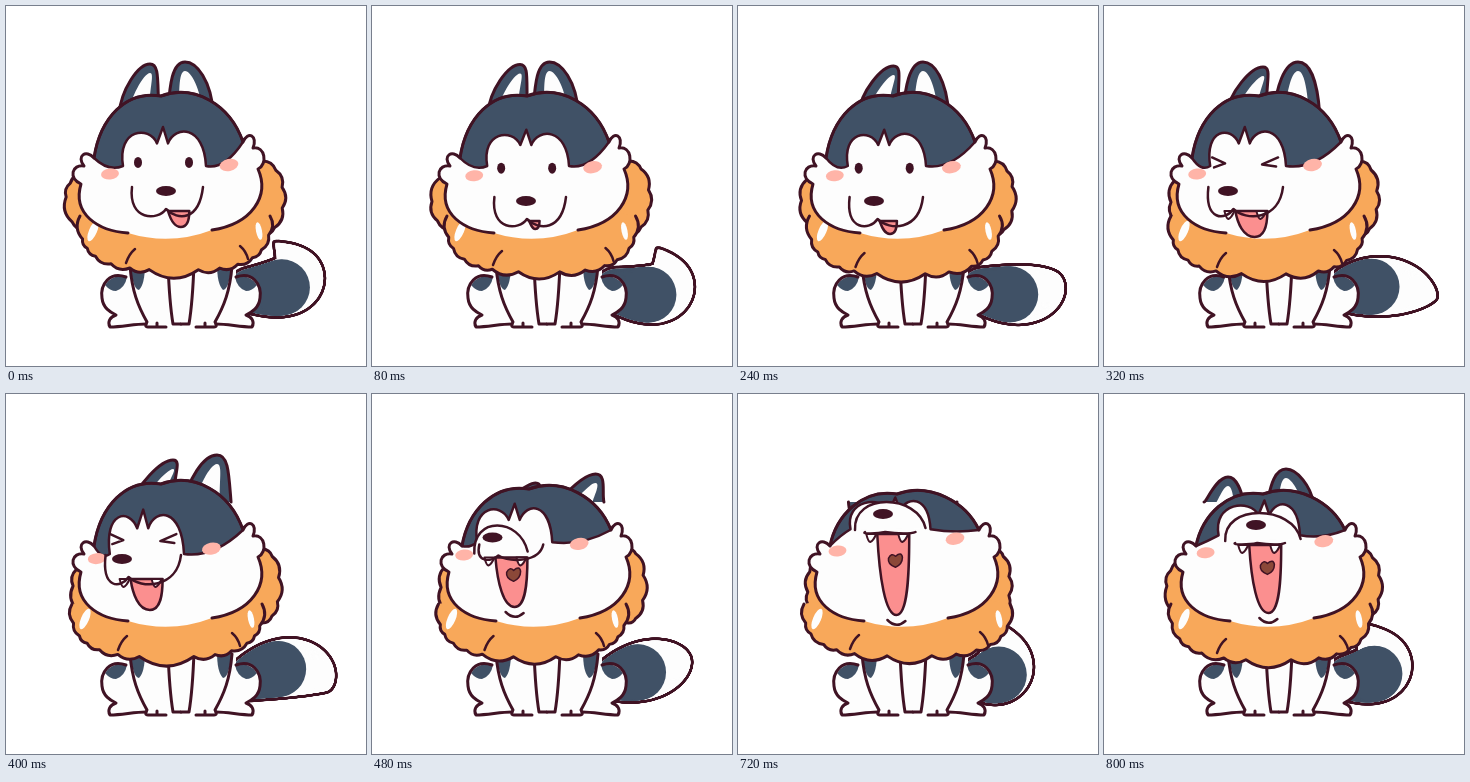
These frames come from a looping animation (360x360 px, 0.88 s). An HTML page with a canvas:

```html
<!DOCTYPE html>
<html lang="en">
<head>
<meta charset="utf-8">
<title>Howling dog</title>
<style>
html, body { margin: 0; width: 100%; height: 100%; overflow: hidden; background: #fff; }
canvas { display: block; width: 360px; height: 360px; }
</style>
</head>
<body>
<canvas id="stage" width="360" height="360"></canvas>
<script>
const ctx = document.getElementById('stage').getContext('2d');
const INK = '#401324', SLATE = '#405166', ORANGE = '#f8a85a', WHITE = '#fdfdfd';
const BLUSH = '#ffb4a8', PINK = '#fb8f8f', BROWN = '#8b4838';
const STEP = 80, STEPS = 11;

// Key poses. back: head thrown back; gape: mouth opening; ears: left and right tip;
// ruff: left, right, bottom; frill: how far the side fur sticks out; tail: bend and tip.
const poses = [
  { at: 0, nose: [160, 185], back: 0, gape: 16, ears: [144, 58, 179, 56], ruff: [74, 264, 264], frill: 1, tail: [325, 285, 268, 236] },
  { at: 2, nose: [148, 205], back: 0, gape: 0, ears: [152, 59, 176, 56], ruff: [76, 263, 268], frill: 1, tail: [322, 322, 302, 248] },
  { at: 4, nose: [124, 185], back: 0, gape: 26, ears: [159, 61, 194, 56], ruff: [67, 260, 268], frill: 0.5, tail: [292, 274, 332, 292] },
  { at: 5, nose: [116, 165], back: 0, gape: 31, ears: [167, 66, 211, 61], ruff: [66, 256, 263], frill: 0.5, tail: [306, 258, 322, 296] },
  { at: 7, nose: [125, 122], back: 1, gape: 68, ears: [160, 112, 236, 99], ruff: [67, 252, 263], frill: 0.2, tail: [276, 286, 306, 234] },
  { at: 9, nose: [145, 120], back: 1, gape: 81, ears: [140, 112, 200, 112], ruff: [66, 272, 262], frill: 0.3, tail: [288, 285, 248, 224] },
  { at: 10, nose: [152, 131], back: 1, gape: 68, ears: [124, 83, 182, 75], ruff: [67, 266, 266], frill: 0.8, tail: [314, 282, 246, 228] }
];

const mix = (a, b, t) => Array.isArray(a) ? a.map((v, i) => mix(v, b[i], t)) : a + (b - a) * t;

function poseAt(step) {
  const i = Math.max(1, poses.findIndex(p => p.at >= step));
  const a = poses[i - 1], b = poses[i], t = (step - a.at) / (b.at - a.at);
  return Object.fromEntries(Object.keys(a).map(key => [key, mix(a[key], b[key], t)]));
}

const random = seed => {
  const v = Math.sin(seed * 12.9898) * 43758.5453;
  return v - Math.floor(v);
};

function paint(path, fill, line = 3) {
  if (fill) { ctx.fillStyle = fill; ctx.fill(path); }
  if (line) { ctx.strokeStyle = INK; ctx.lineWidth = line; ctx.stroke(path); }
}
const shape = (d, fill, line) => paint(new Path2D(d), fill, line);

function oval(x, y, rx, ry, color, tilt = 0) {
  ctx.fillStyle = color;
  ctx.beginPath();
  ctx.ellipse(x, y, rx, ry, tilt, 0, Math.PI * 2);
  ctx.fill();
}

// The tail is a row of discs along a bent spine, swelling and then narrowing to the tip.
function drawTail({ tail: [bx, by, tx, ty] }) {
  const discs = (end, grow, color) => {
    for (let t = 0; t <= end; t += 0.01) {
      const u = 1 - t, r = 30 * Math.sin(Math.PI * (0.25 + 0.75 * t)) ** 0.8 + grow;
      if (r > 0) oval(u * u * 244 + 2 * u * t * bx + t * t * tx, u * u * 284 + 2 * u * t * by + t * t * ty, r, r, color);
    }
  };
  discs(1, 1.5, INK);
  discs(1, -1.5, WHITE);
  discs(0.26, -1.5, SLATE);
}

function drawLegs() {
  const thigh = 'M120 271C104 265 94 278 96 292C97 302 104 306 110 309C104 311 101 316 104 321C116 321 128 318 140 318';
  for (const mirrored of [false, true]) {
    ctx.save();
    if (mirrored) { ctx.translate(350, 0); ctx.scale(-1, 1); }
    shape(thigh + 'L175 318V250H120Z', WHITE, 0);
    shape('M99 279Q106 268 121 271Q119 282 110 285Q104 285 99 279Z', SLATE, 0);
    shape('M124 258Q127 284 133 284Q139 278 139 258Z', SLATE, 0);
    shape(thigh);
    shape('M124 260C126 285 132 300 141 316Q138 321 142 321H160M151 317V320M162 258C163 285 164 300 167 318H175');
    ctx.restore();
  }
}

// Fur edge: jittered notches along an arc, joined by outward bumps.
function drawFur({ cx, cy, rx, ry, from, to, bumps, power = 1, seed }) {
  const bend = v => Math.sign(v) * Math.abs(v) ** power;
  const notches = Array.from({ length: bumps + 1 }, (_, i) => {
    const jitter = i % bumps ? (random(seed + i) - 0.5) * 0.4 : 0;
    const a = mix(from, to, (i + jitter) / bumps);
    return [cx + rx * bend(Math.cos(a)), cy + ry * bend(Math.sin(a))];
  });
  const edge = new Path2D();
  edge.moveTo(...notches[0]);
  for (let i = 1; i <= bumps; i++) {
    const [px, py] = notches[i - 1], [x, y] = notches[i];
    edge.quadraticCurveTo(mix(px, x, 0.5) - (y - py) * 0.35, mix(py, y, 0.5) + (x - px) * 0.35, x, y);
  }
  const body = new Path2D(edge);
  body.lineTo(168, 190);
  paint(body, ORANGE, 0);
  paint(edge);
}

function drawRuff({ ruff: [left, right, bottom], frill }, step) {
  const PI = Math.PI;
  drawFur({ cx: 80, cy: 195, rx: 6 + 14 * frill, ry: 29, from: 1.5 * PI, to: 0.5 * PI, bumps: 4, seed: step });
  drawFur({ cx: 256, cy: 192, rx: 13 + 8 * frill, ry: 37, from: 0.5 * PI, to: -0.5 * PI, bumps: 5, seed: step + 20 });
  drawFur({ cx: (left + right) / 2, cy: 210, rx: (right - left) / 2, ry: bottom - 210,
    from: PI, to: 0, bumps: 13, power: 2 / 3, seed: step + 40 });
  oval(left + 13, 225, 4, 11, WHITE, 0.4);
  oval(right - 11, 225, 3, 9, WHITE, -0.2);
  shape(`M${left + 46} ${bottom - 7}q3 -9 9 -14M${right - 22} ${bottom - 11}q-2 -8 -8 -13`, null, 2.5);
}

function drawEar(cx, tx, ty, width) {
  const ear = (w, y) => `M${cx - w / 2} 108C${cx - w * 0.45} ${y + 26} ${tx - w * 0.3} ${y} ${tx} ${y}
    C${tx + w * 0.25} ${y} ${cx + w * 0.45} ${y + 18} ${cx + w / 2} 108`;
  shape(ear(width, ty), SLATE);
  shape(ear(width * 0.52, ty + 9), WHITE, 0);
}

function drawHead({ nose: [nx, ny], back }) {
  const turn = 160 - nx, drop = 10 * back;
  ctx.save();
  ctx.translate(4 * back, 0);
  const dome = `C224 ${98 + drop} 188 ${78 + drop} 155 ${90 + drop}C120 ${84 + drop} 94 ${112 + drop} 88 152`;
  const outline = `M206 224C246 218 264 190 252 163C262 158 259 140 247 142C252 130 242 124 237 136${dome}
    C80 143 70 150 78 160C66 158 62 172 75 178C66 208 92 225 122 227`;
  shape(outline + 'Q164 240 206 224Z', WHITE, 0);

  // Two brow arches meet in a white spike.
  const x = 157 - 0.45 * turn + 3 * back, y = 121 + (ny - 185) * 0.27;
  const left = 117 - 0.3 * turn - 4 * back, right = 200 - 0.5 * turn - 4 * back;
  const low = 160 + Math.min(0, ny - 165) * 0.55, root = y + (low - y) * 0.42;
  shape(`M237 136${dome}Q${mix(88, left, 0.5)} ${low + 6} ${left} ${low}
    C${left - 6} ${y + 2} ${x - 14} ${y - 2} ${x - 6} ${root}L${x} ${y}L${x + 5} ${root}
    C${x + 12} ${y - 2} ${right - 2} ${y - 2} ${right} ${low}Q${mix(237, right, 0.5)} ${low + 4} 237 136Z`, SLATE, 2.5);
  shape(outline);
  ctx.restore();
}

function drawEyes(left, right, y, open) {
  if (open) {
    for (const x of [left, right]) oval(x, y, 4, 5.5, INK);
  } else {
    shape(`M${left - 7} ${y - 5}l13 6l-11 4M${right + 8} ${y - 5}l-16 7l14 2`, null, 2.5);
  }
}

function drawMouth(x, y, gape, back) {
  const width = 32 * Math.min(1, gape / 24), left = x + 2 - 10 * back, right = left + width;
  const tip = left + width * 0.6, end = y + 2 + gape, half = y + gape * 0.55;
  if (gape) {
    shape(`M${left} ${y + 2}C${left + 2} ${half} ${tip - width * 0.35} ${end} ${tip} ${end}
      C${tip + width * 0.35} ${end} ${right} ${half} ${right} ${y + 2}Z`, PINK, 2.5);
  }
  if (back >= 0.5) {
    shape(`M${tip - 1} ${y + gape * 0.3}q6 -5 7 1q0 7 -7 10q-8 -3 -7 -9q3 -6 7 -2Z`, BROWN, 1.5);
    shape(`M${tip - 9} ${end + 5}q9 9 18 1`, null, 2.5);
  }
  if (gape > 20) for (const fx of [left - 6, right - 6])
    shape(`M${fx - 5} ${y + 2}q2 8 4 8q3 -1 6 -8Z`, WHITE, 2);
}

// Features follow the nose as the head turns and lifts.
function drawFace({ nose: [nx, ny], back, gape }) {
  const turn = 160 - nx, lift = ny - 185;
  oval(104 - 0.3 * turn, 168 + lift * 0.17, 9, 5.5, BLUSH, -0.1);
  oval(223 - 0.4 * turn, 159 + lift * 0.22, 9.5, 6, BLUSH, -0.2);

  if (back >= 0.5) {
    const l = nx - 34 + 0.4 * turn, r = nx + 47 - 0.3 * turn;
    shape(`M${l} ${ny + 16}C${l - 2} ${ny - 22} ${r - 8} ${ny - 20} ${r} ${ny + 14}`, WHITE, 2.5);
  } else {
    const eye = nx - 28 + 0.53 * turn;
    drawEyes(eye, eye + 51, ny * 0.57 + 51, gape < 20);
  }

  const x = nx + 0.15 * turn, y = ny + 18, end = ny - 4 + 22 * back;
  const l = nx - 34 + 0.4 * turn + 10 * back, r = nx + 37 + 0.5 * turn - 12 * back;
  const sag = 2 + 10 * (1 - back);
  drawMouth(x, y, gape, back);
  shape(`M${l} ${end}C${l - 4} ${y + sag} ${x - 8} ${y + sag} ${x} ${y}C${x + 12} ${y + sag} ${r - 4} ${y + sag} ${r} ${end}`, null, 2.5);
  oval(nx, ny, 10, 5, INK);
}

function drawDog(step) {
  const pose = poseAt(step), [lx, ly, rx, ry] = pose.ears;
  drawTail(pose);
  drawLegs();
  drawRuff(pose, step);
  drawEar(135 + (lx - 147) * 0.65, lx, ly, 40);
  drawEar(185 + (rx - 180) * 0.55, rx, ry, 46);
  drawHead(pose);
  drawFace(pose);
}

const start = performance.now();
ctx.lineCap = ctx.lineJoin = 'round';

function render() {
  ctx.fillStyle = '#fff';
  ctx.fillRect(0, 0, 360, 360);
  drawDog(Math.floor((performance.now() - start) / STEP) % STEPS);
  requestAnimationFrame(render);
}
render();
</script>
</body>
</html>
```
